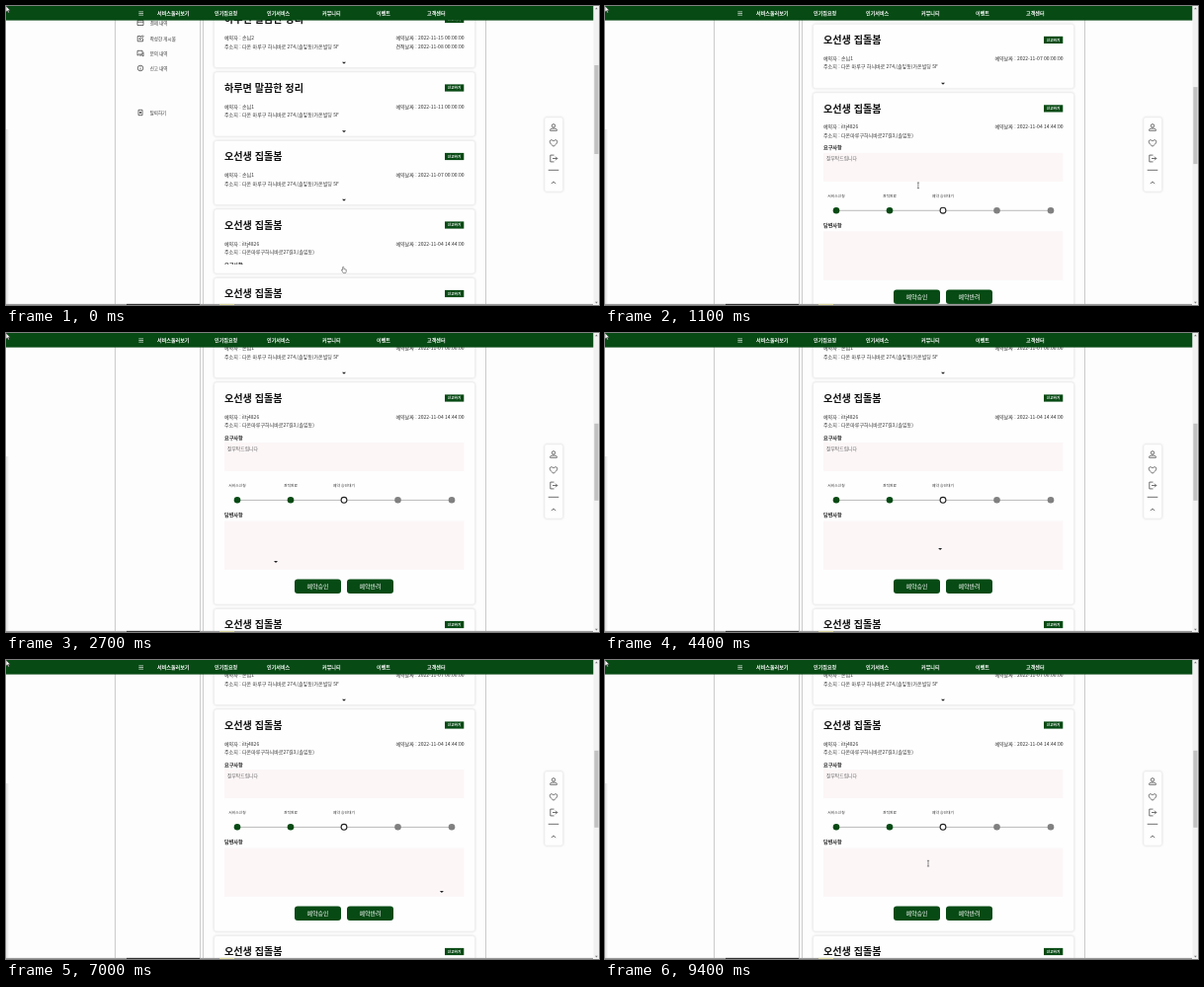
Recreate the animation shown at these times as an HTML page. Size 600 by 303 pixels, loop 10000 ms.

```html
<!DOCTYPE html>
<html lang="ko">
<head>
<meta charset="utf-8">
<style>
html, body { margin: 0; height: 100%; overflow: hidden; background: #fdfdfd; }
svg { display: block; width: 100vw; height: 100vh; }
text { font-family: "Noto Sans CJK KR", "Noto Sans CJK", "Noto Sans", sans-serif; white-space: pre; }
.icon { fill: none; stroke: #333; stroke-width: .7; }
.card { fill: #fefefe; stroke: #ececec; stroke-width: .6; filter: drop-shadow(0 .6px .8px #0002); }
</style>
</head>
<body>
<svg id="stage" viewBox="0 0 600 303" preserveAspectRatio="none"></svg>
<script>
const GREEN = '#074a14', PINK = '#fcf6f7';
const LOOP = 10000, PITCH = 69.5, EXTRA = 160;

const text = (x, y, s, size = 5, fill = '#333', more = '') =>
  `<text x="${x}" y="${y}" font-size="${size}" fill="${fill}" ${more}>${s}</text>`;
const rect = (x, y, w, h, fill, more = '') =>
  `<rect x="${x}" y="${y}" width="${w}" height="${h}" fill="${fill}" ${more}/>`;
const path = (d, more = 'class="icon"') => `<path d="${d}" ${more}/>`;
const at = (x, y, body, id = '') => `<g id="${id}" transform="translate(${x} ${y})">${body}</g>`;
const MID = 'text-anchor="middle"', END = 'text-anchor="end"', BOLD = 'font-weight="bold"';

// Cards are drawn relative to the centre line of their title.
const address = '다온 마루구 하늬바로 274,(솔잎동)가온빌딩 5F';
const cards = [
  ['하루면 말끔한 정리', '손님2', address, '2022-11-15 00:00:00', '2022-11-08 00:00:00'],
  ['하루면 말끔한 정리', '손님1', address, '2022-11-11 00:00:00'],
  ['오선생 집돌봄', '손님1', address, '2022-11-07 00:00:00'],
  ['오선생 집돌봄', 'iltj4826', '다온마루구하늬바로27길3,(솔잎동)', '2022-11-04 14:44:00'],
  ['오선생 집돌봄', '손님1', address, '2022-11-03 00:00:00']
];

function card([title, who, where, date, quote], i) {
  const open = i === 3;
  return at(0, 13.5 + PITCH * i,
    `<rect class="card" ${open ? 'id="box"' : ''} x="210.5" y="-16" width="264" height="65" rx="2.5"/>` +
    text(221, 3.7, title, 10.1, '#111', BOLD) +
    rect(444, -3.6, 19.3, 7.2, GREEN) + text(453.6, 1.4, '신고하기', 3.7, '#fff', MID + BOLD) +
    text(221, 20.5, '예약자 : ' + who) + text(221, 29, '주소지 : ' + where) +
    text(463.5, 20.5, '예약날짜 : ' + date, 5, '#333', END) +
    (quote ? text(463.5, 29, '견적날짜 : ' + quote, 5, '#333', END) : '') +
    (open ? `<clipPath id="clip"><rect id="reveal" x="210" y="32" width="265" height="0"/></clipPath>
      <g clip-path="url(#clip)">${details()}</g>` : '') +
    at(342, 43.3, path('M-2 0H2L0 2Z', 'fill="#222"'), open ? 'arrow' : ''),
    'card' + i);
}

function details() {
  const xs = [234, 288, 342, 396.5, 451];
  const labels = ['서비스신청', '견적완료', '예약 승인대기'];
  const fills = [GREEN, GREEN, '#fff', '#808080', '#808080'];
  const button = (x, s) => rect(x, 183.5, 47, 14.5, GREEN, 'rx="3"') +
    text(x + 23.5, 193, s, 6, '#fff', MID);
  return text(221, 41.5, '요구사항', 5.1, '#222', BOLD) + rect(221, 45, 242.5, 29, PINK) +
    text(224, 52.5, '잘부탁드립니다', 4.8, '#666') +
    path('M234 103.4H451', 'stroke="#aaa" stroke-width=".8"') +
    xs.map((x, i) => `<circle cx="${x}" cy="103.3" r="${i === 2 ? 2.9 : 3.3}" fill="${fills[i]}"
      ${i === 2 ? 'stroke="#222" stroke-width="1.1"' : ''}/>`).join('') +
    labels.map((s, i) => text(xs[i], 90, s, 3.75, '#333', MID)).join('') +
    text(221, 120, '답변사항', 5.1, '#222', BOLD) + rect(221, 124.5, 242.5, 49.5, PINK) +
    button(292, '예약승인') + button(345, '예약반려');
}

const menu = [
  [17, '결제 내역', 'M-3 -2.5H3V2.5H-3ZM-3 -.8H3'],
  [33, '작성한 게시물', 'M.5 -2.5H-2.8V2.8H2.5V0M-1 1L-.7 -.6L2.3 -3.2L3.2 -2.2L.5 .7Z'],
  [48, '문의 내역', 'M-3 -2.7H2V1H-1.6L-3 2.2ZM3 -1.3V3L1.7 2H-1.3'],
  [63, '신고 내역', 'M-2.8 0A2.8 2.8 0 1 0 2.8 0A2.8 2.8 0 1 0 -2.8 0M0 -1.6V-.9M0 -.2V1.6'],
  [108, '탈퇴하기', 'M-2 -2.7H2V2.7H-2ZM-1 -1L1 1M1 -1L-1 1']
];

const nav = [[153, '서비스둘러보기'], [211, '인기집요정'], [264, '인기서비스'],
  [320, '커뮤니티'], [375, '이벤트'], [426, '고객센터']];

const tools = [
  [123, 'M-1.7 -1.6A1.7 1.7 0 1 0 1.7 -1.6A1.7 1.7 0 1 0 -1.7 -1.6M-3.4 3.3V2.5C-3.4 .6 3.4 .6 3.4 2.5V3.3Z'],
  [139, 'M0 3.2C-7 -1.5 -2.5 -5.3 0 -1.9C2.5 -5.3 7 -1.5 0 3.2Z'],
  [154.5, 'M.5 -3.4H-3.2V3.4H.5M-1 0H3.7M2 -1.8L3.8 0L2 1.8'],
  [166, 'M-5.3 .3H5.3'],
  [179, 'M-2.2 1.1L0 -1.1L2.2 1.1']
];

const pointers = {
  arrow: path('M0 0V6L1.4 4.8L2.4 7L3.3 6.6L2.4 4.5H4.2Z', 'fill="#fff" stroke="#333" stroke-width=".5"'),
  hand: path('M.6 .6Q1.4 -.2 1.9 .7V2.6L4.2 3V5.4L3.6 6.6H1.3L-.4 4V3.2L.6 3.6Z',
    'fill="#fff" stroke="#333" stroke-width=".5"'),
  beam: path('M.4 .5H2.6M1.5 .5V6.2M.4 6.2H2.6', 'fill="none" stroke="#444" stroke-width=".6"')
};

const $ = id => document.getElementById(id);
$('stage').innerHTML =
  '<linearGradient id="edge"><stop stop-color="#ddd"/><stop offset="1" stop-color="#fdfdfd"/></linearGradient>' +
  rect(0, 0, 600, 303, '#fdfdfd') + rect(0, 125, 3, 178, 'url(#edge)') +
  [110.3, 196.7, 199.3, 485.5].map(x => rect(x - .35, 14, .7, 289, '#b4b4b4')).join('') +
  at(0, 0, menu.map(([y, s, d]) => at(136, y, path(d)) + text(145.7, y + 1.7, s, 4.5)).join('') +
    cards.map(card).join(''), 'page') +
  rect(0, 301.9, 594, 1.1, '#999') + rect(122, 301.9, 74, 1.1, '#333') + rect(216, 301.9, 15, 1.1, '#d8d39a') +
  rect(0, 0, 594.5, 14.6, GREEN) +
  path('M134.3 5.8H139M134.3 7.5H139M134.3 9.2H139', 'stroke="#fff" stroke-width=".6"') +
  nav.map(([x, s]) => text(x, 9.2, s, 5.05, '#fff', BOLD)).join('') +
  '<rect class="card" x="545" y="113" width="18.5" height="75" rx="2"/>' +
  tools.map(([y, d]) => at(554, y, path(d))).join('') +
  rect(594.5, 0, 5.5, 303, '#f1f1f1') +
  path('M596 3.2H598.8L597.4 1.6ZM596 299.8H598.8L597.4 301.4Z', 'fill="#777"') +
  rect(595.3, 60, 4.2, 90, '#c1c1c1', 'id="thumb"') +
  rect(224, 193, .7, 4.4, '#333', 'id="caret"') +
  Object.entries(pointers).map(([id, d]) => at(0, 0, d, id)).join('');

// Keys are [time, value, value...], joined linearly.
function track(keys, t) {
  const i = keys.findIndex(k => k[0] > t);
  if (i < 0) return keys.at(-1).slice(1);
  const a = keys[i - 1], b = keys[i], p = (t - a[0]) / (b[0] - a[0]);
  return a.slice(1).map((v, j) => v + (b[j + 1] - v) * p);
}
const scrollKeys = [[0, 0], [250, 0], [600, 62.5], [1100, 118], [1450, 156]];
const pointerKeys = [[0, 340, 264], [250, 340, 264], [600, 310, 218], [1100, 315.5, 178.5],
  [1900, 240, 166], [2700, 273, 165], [3500, 285, 166], [4400, 339, 152], [5500, 455, 163],
  [6200, 462, 166], [7000, 441, 168], [7900, 350, 205], [8800, 324.5, 205], [9100, 325.5, 202.8]];

const move = (id, x, y) => $(id).setAttribute('transform', `translate(${x} ${y})`);
const set = (id, name, v) => $(id).setAttribute(name, v);

function draw(t) {
  const [scroll] = track(scrollKeys, t);
  const p = Math.min(1, Math.max(0, (t - 100) / 300));
  const grow = EXTRA * p * p * (3 - 2 * p);
  move('page', 0, -scroll);
  set('box', 'height', 65 + grow);
  set('reveal', 'height', grow + 8);
  move('arrow', 342, 43.3 + grow);
  move('card4', 0, 13.5 + PITCH * 4 + grow);
  const k = grow / EXTRA;
  set('thumb', 'y', 60 - 8 * k + scroll * .255);
  set('thumb', 'height', 90 - 12 * k);

  const [x, y] = track(pointerKeys, t);
  const kind = t < 250 ? 'hand' : (t > 850 && t < 1300) || (t > 7000 && y > 187) ? 'beam' : 'arrow';
  for (const id in pointers) set(id, 'visibility', id === kind ? 'visible' : 'hidden');
  move(kind, x, y);
  set('caret', 'visibility', t >= 8900 && t < 9400 ? 'visible' : 'hidden');
}

const start = performance.now();
function tick() {
  draw((performance.now() - start) % LOOP);
  requestAnimationFrame(tick);
}
tick();
</script>
</body>
</html>
```
